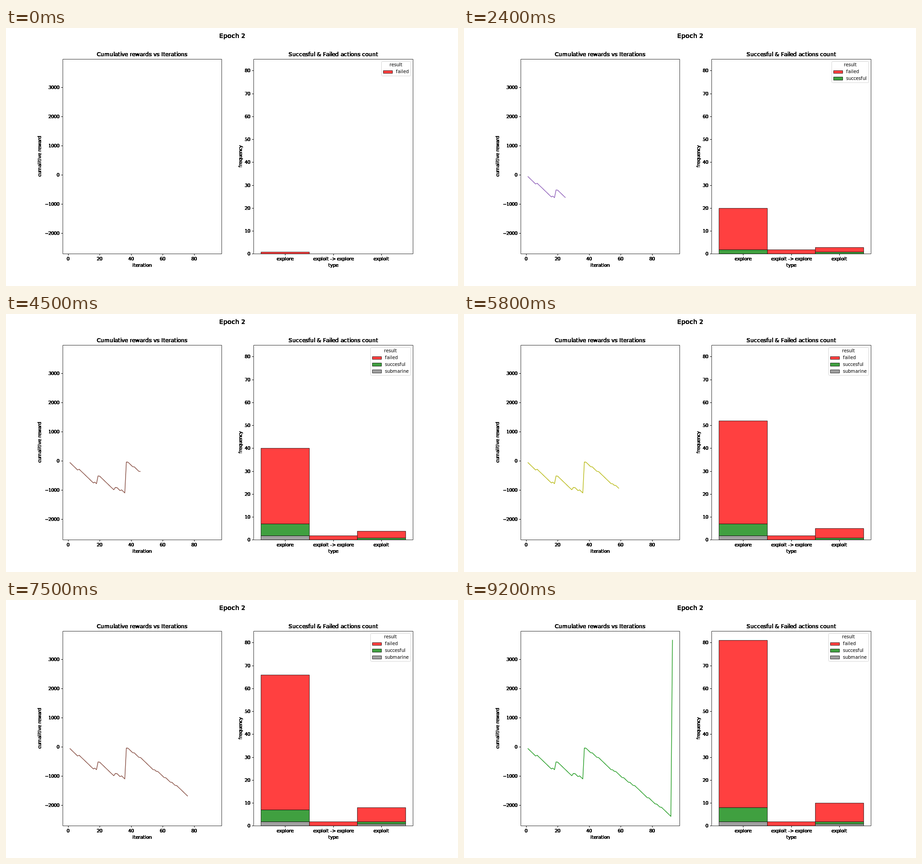
Recreate the animation shown at these times as an HTML page with a canvas. Size 990 by 566 pixels, loop 9.3 s.

```html
<!DOCTYPE html>
<html lang="en">
<head>
<meta charset="utf-8">
<title>Epoch 2</title>
<style>
html, body { margin: 0; width: 990px; height: 566px; overflow: hidden; background: #fff; }
canvas { display: block; }
</style>
</head>
<body>
<canvas id="stage" width="990" height="566"></canvas>
<script>
const ctx = document.getElementById('stage').getContext('2d');
const STEP = 100, COUNT = 93;
const TOP = 67.92, BOTTOM = 495.25, MID = (TOP + BOTTOM) / 2;
const LEFT = [123.75, 542.25], WIDTH = 348.7;

const cycle = ['#1f77b4', '#ff7f0e', '#2ca02c', '#d62728', '#9467bd',
               '#8c564b', '#e377c2', '#7f7f7f', '#bcbd22', '#17becf'];
const results = ['failed', 'succesful', 'submarine'];
const fills = ['#ff4040', '#40a040', '#a0a0a0'];
const types = ['explore', 'exploit -> explore', 'exploit'];

// Every iteration costs MISS, a cheap one costs CHEAP, a hit earns its gain
const MISS = 52, CHEAP = 5;
const gains = { 7: 25, 17: 25, 19: 265, 30: 80, 34: 25, 37: 1060, 93: 6050 };
const cheap = [20, 31, 38, 42, 46, 55, 57, 62, 66, 69, 78, 83, 86];
const submarines = [31, 42, 66];
const retries = [8, 9];
const exploits = [18, 19, 20, 38, 55, 66, 69, 74, 83, 86];

const reward = n => gains[n] || (cheap.includes(n) ? -CHEAP : -MISS);
const typeOf = n => exploits.includes(n) ? 2 : retries.includes(n) ? 1 : 0;
const resultOf = n => submarines.includes(n) ? 2 : gains[n] ? 1 : 0;

const iterX = n => LEFT[0] + (n + 3.6) * WIDTH / 101.2;
const rewardY = v => TOP + (3973.5 - v) * 0.064;
const typeX = i => LEFT[1] + (i + 0.65) * WIDTH / 3.3;
const countY = c => Math.min(BOTTOM, 495.63 - c * 5.03);

// Glyphs advance by whole pixels, as in hinted plot text
function advances(str, size = 10) {
  ctx.font = `${size}px "DejaVu Sans", sans-serif`;
  return [...str].map(ch => Math.round(ctx.measureText(ch).width));
}

const textWidth = (str, size) => advances(str, size).reduce((a, b) => a + b, 0);

function text(str, x, y, { size = 10, align = 0.5, passes = 12, turn = 0 } = {}) {
  str = String(str);
  ctx.save();
  ctx.translate(Math.round(x), Math.round(y));
  ctx.rotate(turn);
  ctx.fillStyle = '#000';
  const steps = advances(str, size);
  let pen = Math.round(-align * textWidth(str, size));
  [...str].forEach((ch, i) => {
    // Repeated passes darken the soft glyph edges
    for (let p = 0; p < passes; p++) ctx.fillText(ch, pen, 0);
    pen += steps[i];
  });
  ctx.restore();
}

function box(x0, y0, x1, y1, weight, fill) {
  const [l, t, r, b] = [x0, y0, x1, y1].map(v => Math.round(v) + 0.5);
  if (fill) {
    ctx.fillStyle = fill;
    ctx.fillRect(l, t, r - l, b - t);
  }
  ctx.lineWidth = weight;
  ctx.strokeStyle = '#000';
  ctx.strokeRect(l, t, r - l, b - t);
}

function xTick(x, label) {
  ctx.fillStyle = '#000';
  ctx.fillRect(Math.round(x), 496, 1, 3);
  text(label, x, 510);
}

function yTick(left, y, label) {
  ctx.fillStyle = '#000';
  ctx.fillRect(Math.round(left) - 3, Math.round(y), 3, 1);
  text(label, left - 7, Math.round(y) + 4, { align: 1 });
}

function axes(i, title, xLabel, yLabel, yLabelX) {
  const mid = LEFT[i] + WIDTH / 2;
  box(LEFT[i], TOP, LEFT[i] + WIDTH, BOTTOM, 0.8);
  text(title, mid, 62, { size: 12 });
  text(xLabel, mid, 524);
  text(yLabel, yLabelX, MID, { turn: -Math.PI / 2 });
}

function drawFrame() {
  text('Epoch 2', 495, 22, { size: 14 });
  axes(0, 'Cumulative rewards vs Iterations', 'iteration', 'cumalitive reward', 77);
  axes(1, 'Succesful & Failed actions count', 'type', 'frequency', 517);
  for (let n = 0; n <= 80; n += 20) xTick(iterX(n), n);
  for (let v = -2000; v <= 3000; v += 1000)
    yTick(LEFT[0], rewardY(v), String(v).replace('-', '\u2212'));
  types.forEach((t, i) => xTick(typeX(i), t));
  for (let c = 0; c <= 80; c += 10) yTick(LEFT[1], countY(c), c);
}

function drawLine(n) {
  let total = 0;
  ctx.beginPath();
  for (let k = 1; k <= n; k++) {
    total += reward(k);
    ctx.lineTo(iterX(k), rewardY(total));
  }
  ctx.lineWidth = 1.5;
  ctx.lineJoin = 'round';
  ctx.strokeStyle = cycle[(n - 1) % 10];
  ctx.stroke();
}

function drawBars(n) {
  const half = WIDTH / 6.6;
  const counts = types.map(() => [0, 0, 0]);
  for (let k = 1; k <= n; k++) counts[typeOf(k)][resultOf(k)]++;
  counts.forEach((row, i) => {
    let base = 0;
    for (let r = 2; r >= 0; r--) {
      if (!row[r]) continue;
      const top = base + row[r];
      box(typeX(i) - half, countY(top), typeX(i) + half, countY(base), 0.75, fills[r]);
      base = top;
    }
  });
}

function drawLegend(n) {
  let rows = 1;
  for (let k = 1; k <= n; k++) rows = Math.max(rows, resultOf(k) + 1);
  const shown = results.slice(0, rows);
  const left = 886.4 - 36 - Math.max(...shown.map(s => textWidth(s)));
  ctx.beginPath();
  ctx.roundRect(Math.round(left) + 0.5, 73.5, 886 - Math.round(left), 17 + rows * 14.7, 2);
  ctx.fillStyle = '#fff';
  ctx.fill();
  ctx.lineWidth = 1;
  ctx.strokeStyle = '#d6d6d6';
  ctx.stroke();
  text('result', (left + 886.4) / 2, 84, { passes: 1 });
  shown.forEach((label, r) => {
    const y = 92.6 + r * 14.7;
    box(left + 4, y, left + 24, y + 6.7, 0.75, fills[r]);
    text(label, left + 32, y + 6.7, { passes: 1, align: 0 });
  });
}

function draw(now) {
  const n = Math.floor(now / STEP) % COUNT + 1;
  ctx.fillStyle = '#fff';
  ctx.fillRect(0, 0, 990, 566);
  drawLine(n);
  drawBars(n);
  drawFrame();
  drawLegend(n);
}

function tick() {
  draw(performance.now());
  requestAnimationFrame(tick);
}
tick();
</script>
</body>
</html>
```
